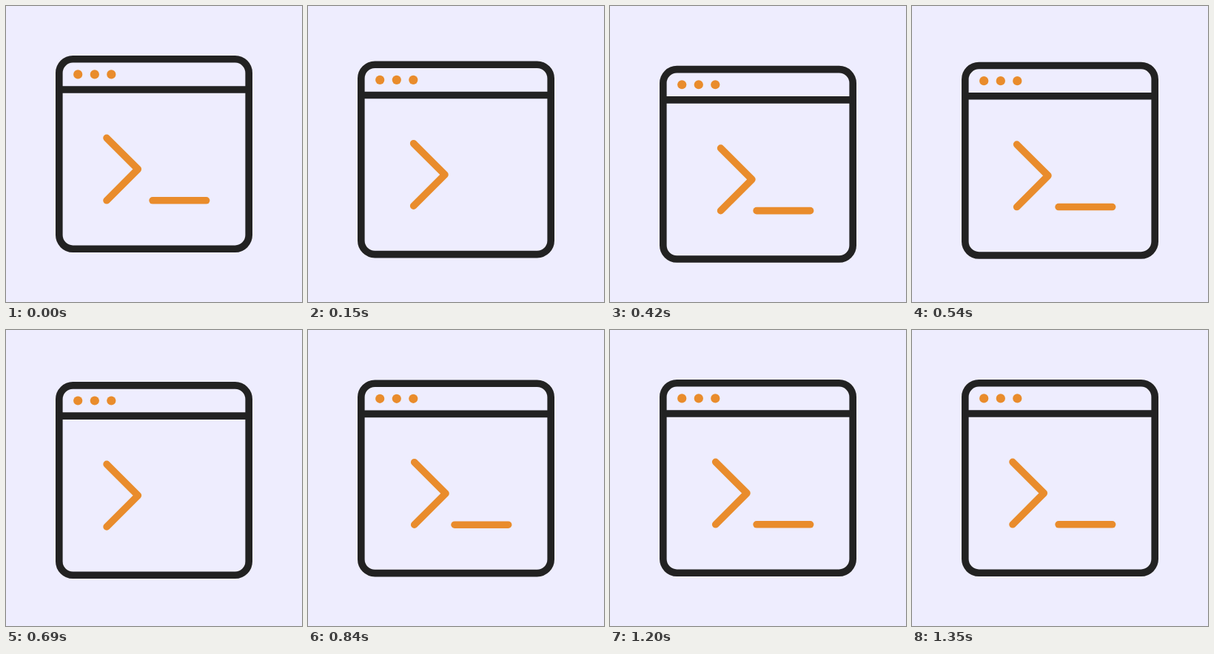
Write an HTML page that moves like this. It is 400 px wide and 400 px high and loops after 1.38 s.

```html
<!DOCTYPE html>
<html>
<head>
<meta charset="utf-8">
<style>
  html, body { margin: 0; width: 100%; height: 100%; overflow: hidden; background: #eeedfe; }
  svg { display: block; width: 100%; height: 100%; }
</style>
</head>
<body>
<svg viewBox="0 0 400 400" fill="none" stroke-width="9.6" stroke-linecap="round" stroke-linejoin="round">
  <g id="terminal">
    <g stroke="#222">
      <rect x="71.8" y="71.8" width="256.4" height="256.4" rx="18.6"/>
      <path d="M72 113H328"/>
    </g>
    <g fill="#e98c2c">
      <circle cx="97.2" cy="92.4" r="6.1"/>
      <circle cx="119.8" cy="92.4" r="6.1"/>
      <circle cx="142.3" cy="92.4" r="6.1"/>
    </g>
    <g stroke="#e98c2c">
      <path id="prompt" d="M136 178.3L178.3 220.5L136 262.8"/>
      <path id="cursor" d="M198.1 262.8H270.6"/>
    </g>
  </g>
</svg>
<script>
  const LOOP = 1380, STEP = 30, CYCLE = 1350, TRAVEL = 16;
  const PEAK = 315, REST = 980;
  const [terminal, prompt_, cursor] =
    ['terminal', 'prompt', 'cursor'].map(id => document.getElementById(id));

  const smooth = u => u * u * (3 - 2 * u);

  // Quick drop, then a longer rise that settles slowly.
  function dropAt(t) {
    if (t < PEAK) return TRAVEL * smooth(t / PEAK);
    const left = Math.max(0, (REST - t) / (REST - PEAK));
    return TRAVEL * smooth(left ** 1.53);
  }

  // Two eased swings to the right and back.
  function swingAt(t) {
    const u = t / (CYCLE / 4) % 2;
    return TRAVEL * smooth(u < 1 ? u : 2 - u);
  }

  function draw(now) {
    const t = Math.floor(now % LOOP / STEP) * STEP;
    const blink = t % 450;
    terminal.setAttribute('transform', `translate(0 ${dropAt(t)})`);
    prompt_.setAttribute('transform', `translate(${swingAt(t)} 0)`);
    cursor.setAttribute('visibility', blink >= 150 && blink < 300 ? 'hidden' : 'visible');
  }

  const start = performance.now();
  function tick() {
    draw(performance.now() - start);
    requestAnimationFrame(tick);
  }
  tick();
</script>
</body>
</html>
```
